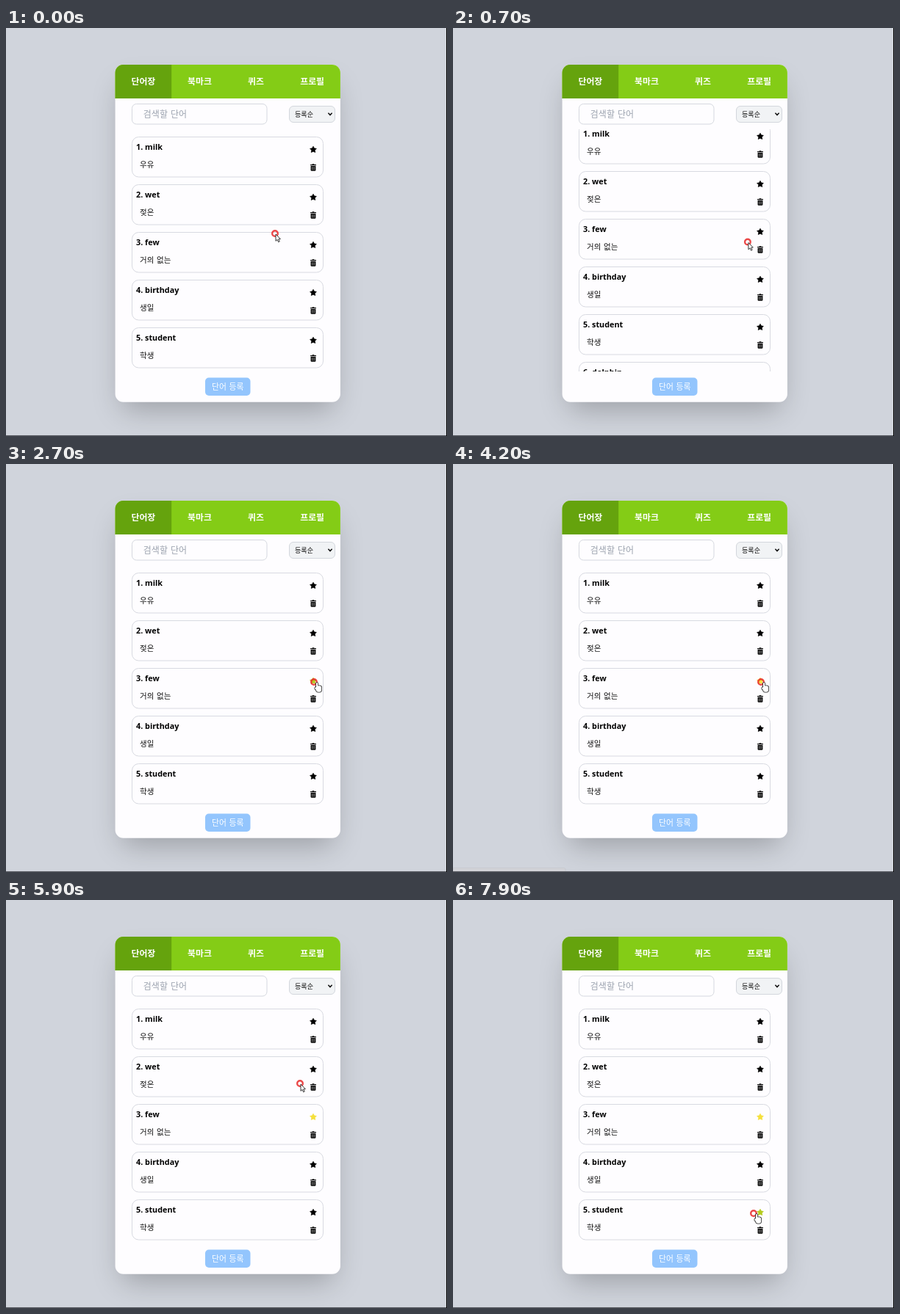
An HTML page with a canvas for the animation above (8000 ms loop, 600x556 px).

```html
<!DOCTYPE html>
<html lang="ko">
<head>
<meta charset="utf-8">
<title>단어장</title>
<style>
html, body { margin: 0; width: 100%; height: 100%; overflow: hidden; background: #d0d4dc; }
canvas { display: block; }
</style>
</head>
<body>
<canvas id="stage" width="600" height="556"></canvas>
<script>
const ctx = document.getElementById('stage').getContext('2d');
const LOOP = 8000, STEP = 100;
const KR = '"Noto Sans CJK KR", "Noto Sans KR", "Noto Sans CJK", "Noto Sans CJK JP", sans-serif';
const LATIN = '"Open Sans", "Noto Sans", sans-serif';
const YELLOW = '#f5e03c', HOVER = '#b4cb1e';
const PANEL = { x: 148.6, y: 50.1, w: 306.3, h: 459.6, r: 11, head: 46 };
const LIST = { top: 138, height: 330, pad: 10.5, pitch: 65, maxScroll: 69.5 };

const tabs = ['단어장', '북마크', '퀴즈', '프로필'];
const words = [
  ['milk', '우유'], ['wet', '젖은'], ['few', '거의 없는'],
  ['birthday', '생일'], ['student', '학생'], ['dolphin', '돌고래']
];

// Places where the pointer rests or turns
const stops = [
  { t: 0, x: 366, y: 280 }, { t: 300, x: 373, y: 283 },
  { t: 1000, x: 419, y: 297 }, { t: 4300, x: 419, y: 297 },
  { t: 5200, x: 366, y: 327 }, { t: 5900, x: 400, y: 250 },
  { t: 7100, x: 409, y: 421 }, { t: 7900, x: 409, y: 427 }
];

function ease(t, start, duration) {
  const p = Math.min(1, Math.max(0, (t - start) / duration));
  return p * p * (3 - 2 * p);
}

// Each visit scrolls to the end of the list and back
const visit = (t, down, up) => ease(t, down, 300) - ease(t, up, 300);
const scrollAt = t => LIST.maxScroll * (visit(t, 0, 500) + visit(t, 4700, 5300));

function pointerAt(t) {
  const i = Math.max(1, stops.findIndex(s => s.t >= t));
  const a = stops[i - 1], b = stops[i];
  const p = ease(t, a.t, b.t - a.t);
  return [a.x + (b.x - a.x) * p, a.y + (b.y - a.y) * p];
}

function text(str, x, y, size, color, { weight = 400, family = KR, align = 'left' } = {}) {
  ctx.font = `${weight} ${size}px ${family}`;
  ctx.wordSpacing = family === KR ? '1.3px' : '0px';
  ctx.textAlign = align;
  ctx.fillStyle = color;
  ctx.fillText(str, x, y);
}

function box(x, y, w, h, r, fill, stroke, lineWidth = 1) {
  ctx.beginPath();
  ctx.roundRect(x, y, w, h, r);
  if (fill) { ctx.fillStyle = fill; ctx.fill(); }
  if (stroke) { ctx.strokeStyle = stroke; ctx.lineWidth = lineWidth; ctx.stroke(); }
}

function star(x, y, color) {
  ctx.beginPath();
  for (let i = 0; i < 10; i++) {
    const r = i % 2 ? 2.4 : 4.6, a = -Math.PI / 2 + i * Math.PI / 5;
    ctx.lineTo(x + r * Math.cos(a), y + r * Math.sin(a));
  }
  ctx.closePath();
  ctx.lineJoin = 'round';
  ctx.lineWidth = 0.7;
  ctx.fillStyle = ctx.strokeStyle = color;
  ctx.fill();
  ctx.stroke();
}

function trash(x, y) {
  box(x - 4, y - 4, 8, 1.3, 0.5, '#000');
  box(x - 1.5, y - 4.8, 3, 1.2, 0.5, '#000');
  box(x - 3.4, y - 2.1, 6.8, 6.8, [0, 0, 1.2, 1.2], '#000');
  ctx.fillStyle = '#bbb';
  for (const dx of [-1.8, 0, 1.8]) ctx.fillRect(x + dx - 0.3, y - 0.9, 0.6, 4.4);
}

function panel() {
  const { x, y, w, h, r, head } = PANEL, tab = w / tabs.length;
  ctx.fillStyle = '#d0d4dc';
  ctx.fillRect(0, 0, 600, 556);
  ctx.save();
  ctx.shadowColor = 'rgba(0,0,0,.25)';
  ctx.shadowBlur = 38;
  ctx.shadowOffsetY = 19;
  box(x + 9, y + 9, w - 18, h - 18, r, '#fff');
  ctx.restore();
  box(x, y, w, h, r, '#fefdff');
  box(x, y, w, head, [r, r, 0, 0], '#84cc16');
  box(x, y, tab, head, [r, 0, 0, 0], '#65a30d');
  tabs.forEach((label, i) =>
    text(label, x + (i + 0.5) * tab, 77.3, 11.9, '#fff', { weight: 700, align: 'center' }));
}

function controls() {
  box(171.5, 103.5, 183.5, 27.5, 6, '#fefdff', '#d5d8df');
  text('검색할 단어', 186.8, 121.8, 12, '#9ca3af');
  box(385.5, 106.5, 62, 22, 5.5, '#f1f3f5', '#d3d7dd');
  text('등록순', 393, 120.8, 9.1, '#111');
  ctx.lineWidth = 1.5;
  ctx.strokeStyle = '#111';
  ctx.stroke(new Path2D('M438.4 115.8l2.6 2.8l2.6 -2.8'));
  box(271, 476.5, 61.5, 24.5, 5, '#93c5fd');
  text('단어 등록', 301.7, 492.7, 10.8, '#fff', { align: 'center' });
}

function starColor(word, t) {
  if (word === 'few' && t >= 1000) return t < 3900 ? HOVER : YELLOW;
  if (word === 'student' && t >= 6900) return HOVER;
  return '#000';
}

function list(t) {
  const scroll = scrollAt(t);
  ctx.save();
  ctx.beginPath();
  ctx.rect(150, LIST.top, 304, LIST.height);
  ctx.clip();
  words.forEach(([word, meaning], i) => {
    const y = Math.floor(LIST.top + LIST.pad + i * LIST.pitch - scroll) + 0.5;
    box(171.5, y, 260, 54.5, 9, '#fefdff', '#d8dae1');
    text(`${i + 1}. ${word}`, 177, y + 17.5, 10.8, '#000', { weight: 700, family: LATIN });
    text(meaning, 182, y + 41, 10.5, '#111');
    star(418, y + 17.3, starColor(word, t));
    trash(418, y + 41.5);
  });
  ctx.restore();
}

function hand(x, y) {
  const parts = (fill, stroke) => {
    box(x + 3, y + 1, 2.3, 8, 1.1, fill, stroke, 1.6);
    box(x + 1.3, y + 7, 4, 3.4, 1.5, fill, stroke, 1.6);
    box(x + 3, y + 5.3, 7.2, 8.4, [1, 2.5, 3, 3], fill, stroke, 1.6);
  };
  parts(null, '#222');
  parts('#fff');
}

function arrow(x, y) {
  const path = new Path2D('M0 0V9.3L2.1 7.4L3.6 10.7L5.2 10L3.7 6.8L6.4 6.6Z');
  ctx.save();
  ctx.translate(x + 1, y + 1);
  ctx.lineWidth = 0.9;
  ctx.fillStyle = '#fff';
  ctx.strokeStyle = '#222';
  ctx.fill(path);
  ctx.stroke(path);
  ctx.restore();
}

function pointer(t) {
  const [x, y] = pointerAt(t);
  const onStar = (t >= 1000 && t < 4500) || t >= 6900;
  ctx.beginPath();
  ctx.arc(x, y, 3.8, 0, Math.PI * 2);
  ctx.strokeStyle = 'rgba(232,40,40,.85)';
  ctx.lineWidth = 2.4;
  ctx.stroke();
  (onStar ? hand : arrow)(x, y);
}

function edges(t) {
  if (t >= 3700 && t < 4700) box(0, 550.5, 153, 6, [0, 2, 0, 0], '#d2d3d8', '#c8cad0');
  ctx.fillStyle = '#55585e';
  ctx.fillRect(0, 555, 600, 1);
  ctx.fillStyle = '#000';
  ctx.fillRect(599, 0, 1, 556);
}

function tick(now) {
  const t = Math.floor(now % LOOP / STEP) * STEP;
  panel();
  controls();
  list(t);
  edges(t);
  pointer(t);
  requestAnimationFrame(tick);
}
requestAnimationFrame(tick);
</script>
</body>
</html>
```
